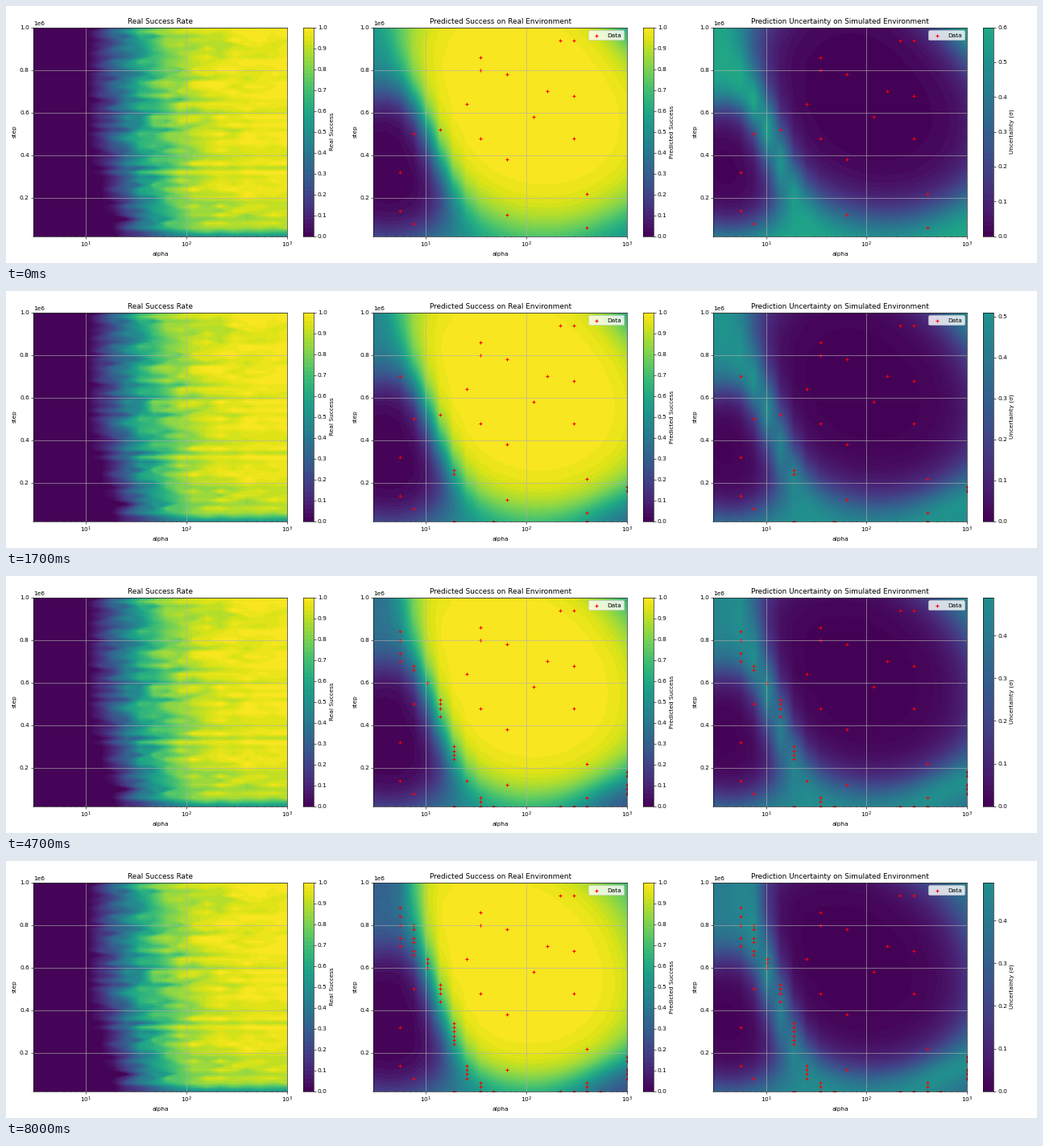
A matplotlib script for the animation above (8100 ms loop, 1280 by 320 pixels).

```python
import numpy as np
import matplotlib.pyplot as plt
from matplotlib.animation import FuncAnimation
from matplotlib.colorbar import make_axes_gridspec
from matplotlib.ticker import MultipleLocator

W = 1280
FRAMES, INTERVAL = 81, 100
COLS, ROWS = 20, 50
PANEL_W, PANEL_H = 313, 258

plt.rcParams["font.family"] = "DejaVu Sans"
alphas = np.logspace(np.log10(3), 3, COLS)
steps = np.arange(1, ROWS + 1) * 0.02e6
# Grid positions measured from the upper left corner of a panel
gx, gy = np.meshgrid(np.linspace(0, PANEL_W, COLS),
                     np.linspace(PANEL_H, 0, ROWS))
RATE_LEVELS = np.linspace(0, 1, 51)

# Starting samples as (column, row)
START = [(14, 47), (15, 47), (8, 43), (8, 40), (10, 39), (13, 35), (15, 34),
         (7, 32), (12, 29), (5, 26), (3, 25), (8, 24), (15, 24), (10, 19),
         (2, 16), (16, 11), (2, 7), (10, 6), (3, 4), (16, 3)]
# Later samples fill straight runs: first cell, last cell, count, frame span
RUNS = [((2, 35), (2, 44), 5, (5, 60)), ((3, 33), (3, 40), 6, (30, 75)),
        ((4, 30), (4, 32), 3, (40, 70)), ((5, 22), (5, 25), 3, (24, 47)),
        ((6, 12), (6, 17), 6, (6, 62)), ((7, 7), (7, 4), 4, (42, 78)),
        ((8, 3), (8, 1), 3, (22, 46)), ((6, 1), (9, 1), 2, (4, 8)),
        ((16, 1), (14, 1), 3, (15, 45)), ((16, 2), (17, 1), 2, (58, 76)),
        ((19, 9), (19, 4), 5, (3, 40))]


def sample_schedule():
    rows = [(0, c, r) for c, r in START]
    for (c0, r0), (c1, r1), count, (begin, end) in RUNS:
        run = np.linspace((begin, c0, r0), (end, c1, r1), count)
        rows.extend(np.rint(run).astype(int))
    return np.array(rows)


SCHEDULE = sample_schedule()


def samples(n):
    seen = SCHEDULE[SCHEDULE[:, 0] <= n]
    return np.column_stack([alphas[seen[:, 1]], steps[seen[:, 2] - 1]])


def sigmoid(v):
    return 1 / (1 + np.exp(-v))


def gauss(cx, cy, sx, sy):
    return np.exp(-((gx - cx) / sx) ** 2 - ((gy - cy) / sy) ** 2)


def real_success():
    """Rise along alpha, later and steeper for small step, with row streaks."""
    rng = np.random.default_rng(4)
    early = sigmoid((0.28e6 - steps[:, None]) / 0.08e6)
    rise = np.clip(np.arange(COLS) - 4 - 2 * early, 0, None)
    rate = 1 - np.exp(-(rise / (4.3 - 0.8 * early)) ** 1.4)
    rate = rate * (0.98 - 0.04 * early)
    noise = 0.6 * rng.normal(size=(ROWS, 1)) + 0.7 * rng.normal(size=rate.shape)
    rate = rate + 0.17 * np.sqrt(rate * (1 - rate)) * noise
    rate *= 1 - 0.45 * np.exp(-np.arange(ROWS)[:, None] / 1.5)
    return np.clip(rate, 0, 1)


def success_side(n, t):
    dx, dy = gx - (192 - 22 * t), gy - (85 + 12 * t)
    along, across = 0.8 * dx + 0.6 * dy, 0.6 * dx - 0.8 * dy
    r = np.hypot(along / (145 - 3 * t), across / (118 - 10 * t))
    logit = 6 * np.exp(-np.log(2) * r ** 3)
    logit += (1.6 * t - 1.2) * gauss(PANEL_W, 0, 80, 80)
    logit -= (0.5 + 0.8 * min(1, n / 30)) * gauss(PANEL_W, PANEL_H, 80, 60)
    logit -= 0.35 * t * np.exp(-((PANEL_H - gy) / 35) ** 2)
    return sigmoid(logit)


def failure_side(t):
    blob = np.exp(-(np.hypot(gx - 20, gy - 172) / 75) ** 2.3)
    return sigmoid(-5.5 * blob - 0.85 * t * np.exp(-gy / 150))


def predicted(n):
    """Blend the failure side into the success side across a curved ridge."""
    t = (n / (FRAMES - 1)) ** 0.7
    ridge = 46 + 0.12 * gy + 0.00065 * gy ** 2 - 28 * (1 - t) * np.exp(-gy / 80)
    width = 7.5 + 6 * (1 - t) * np.exp(-gy / 60) + 6 * (gy / PANEL_H) ** 4
    blend = sigmoid((gx - ridge) / width)
    low = failure_side(t)
    return low + (success_side(n, t) - low) * blend


def uncertainty(n, p):
    peak = max(0.487, 0.5168 - 0.0006 * n) + 0.08 * np.exp(-n / 3)
    step = 0.015 if peak > 0.51 else 0.01
    levels = step * np.arange(np.ceil(peak / step - 1e-6) + 1)
    ridge = 1 - 0.15 * gauss(95, 165, 45, 60)
    return 4 * p * (1 - p) * peak * ridge, levels


def style_panel(ax, title):
    ax.set_xscale("log")
    ax.set(xlim=(alphas[0], alphas[-1]), ylim=(steps[0], steps[-1]),
           xlabel="alpha", ylabel="step", title=title)
    ax.grid(True)


def add_bar(panel, label, levels):
    ax, _ = make_axes_gridspec(panel)
    image = ax.imshow(np.zeros((2, 1)), cmap="viridis", vmin=0, vmax=1,
                      origin="lower", aspect="auto", interpolation="nearest")
    ax.set_xticks([])
    ax.yaxis.tick_right()
    ax.yaxis.set_label_position("right")
    ax.yaxis.set_major_locator(MultipleLocator(0.1))
    ax.yaxis.set_major_formatter("{x:.1f}")
    ax.set_ylabel(label)
    set_bar(image, levels)
    return image


def set_bar(image, levels):
    image.set_data(((levels[1:] + levels[:-1]) / 2)[:, None])
    image.set_extent((0, 1, 0, levels[-1]))
    image.axes.set_ylim(0, levels[-1])


def fill(ax, values, levels):
    return ax.contourf(alphas, steps, np.clip(values, 0, levels[-1] * 0.9999),
                       levels=levels, cmap="viridis", vmin=0, vmax=1)


def add_samples(ax):
    dots = ax.scatter([], [], s=36, c="red", marker="+", zorder=1.2, label="Data")
    ax.legend(loc="upper right")
    return dots


fig, panels = plt.subplots(1, 3, figsize=(24, 6), dpi=W / 24)
real_ax, mean_ax, sigma_ax = panels
style_panel(real_ax, "Real Success Rate")
style_panel(mean_ax, "Predicted Success on Real Environment")
style_panel(sigma_ax, "Prediction Uncertainty on Simulated Environment")
add_bar(real_ax, "Real Success", RATE_LEVELS)
add_bar(mean_ax, "Predicted Success", RATE_LEVELS)
sigma_bar = add_bar(sigma_ax, "Uncertainty (σ)", uncertainty(0, predicted(0))[1])
fig.tight_layout()
fill(real_ax, real_success(), RATE_LEVELS)
dot_sets = [add_samples(mean_ax), add_samples(sigma_ax)]
filled = []


def update(frame):
    n = frame - 1 if frame == 60 else frame  # one pause near the end
    while filled:
        filled.pop().remove()
    p = predicted(n)
    sigma, levels = uncertainty(n, p)
    filled.extend([fill(mean_ax, p, RATE_LEVELS), fill(sigma_ax, sigma, levels)])
    set_bar(sigma_bar, levels)
    for dots in dot_sets:
        dots.set_offsets(samples(n))
    return dot_sets


anim = FuncAnimation(fig, update, frames=FRAMES, interval=INTERVAL,
                     init_func=lambda: update(0), repeat=True, blit=False)
plt.show()
```
